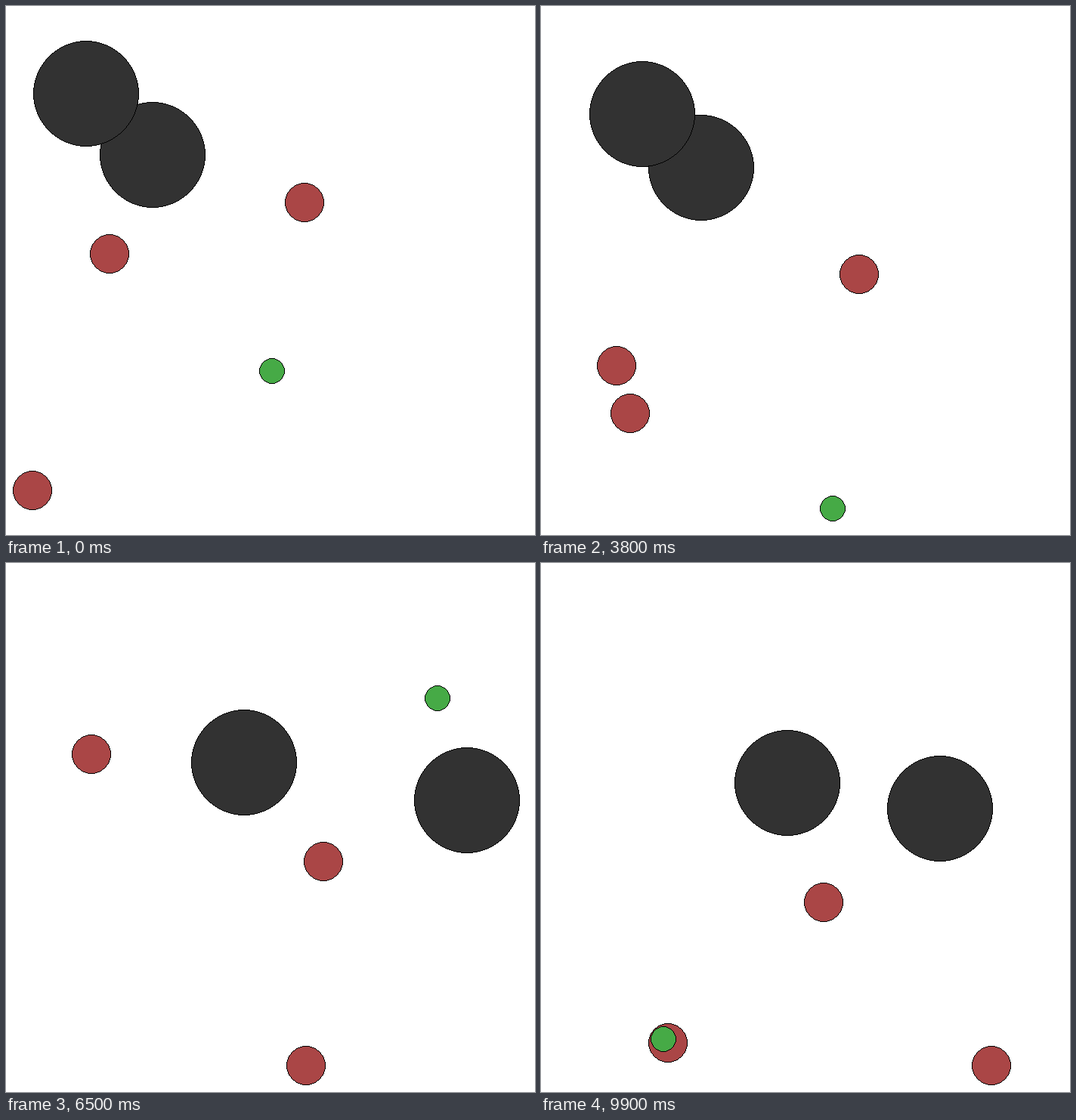
Recreate the animation shown at these times as an HTML page with a canvas. Size 700x700 px, loop 10000 ms.

```html
<!DOCTYPE html>
<html lang="en">
<head>
<meta charset="utf-8">
<title>Pursuit</title>
<style>
html, body { margin: 0; width: 100%; height: 100%; overflow: hidden; background: #fff; }
canvas { display: block; }
</style>
</head>
<body>
<canvas id="c" width="700" height="700"></canvas>
<script>
const ctx = document.getElementById('c').getContext('2d');
const STEP = 100, STEPS = 50, MID = 350, REACH = 315;

const CHASER = { r: 26, color: 'rgb(170,70,70)' };
const RUNNER = { r: 17, color: 'rgb(70,170,70)' };
const ROCK = { r: 70, color: 'rgb(50,50,50)' };

// Movers pass one point per beat; a rock has a single point.
const body = (kind, ...path) => ({ ...kind, path });

const rounds = [
  {
    beats: [0, 11, 23, 38, 45],
    bodies: [
      body(CHASER, [45.5, -89.5], [258, 70], [37.7, 256.1], [-261.7, 214.2], [-215, 273]),
      body(CHASER, [-212.5, -21.5], [-90, -50], [37.7, -65.1], [80.8, 6.2], [100, 25]),
      body(CHASER, [-315, 291.5], [-247, 195], [-308.5, 158.2], [-282.1, 143], [-272, 148]),
      body(RUNNER, [2.5, 133.5], [-60, 180], [-105.3, 226.7], [41.3, 356.1], [200, 210]),
      body(ROCK, [-155.9, -152.9]),
      body(ROCK, [-243.9, -233.02])
    ]
  },
  {
    beats: [4, 15, 27, 34, 49],
    bodies: [
      body(CHASER, [171.5, -35.5], [85.2, 55], [105, 60], [130.7, 53], [43.2, 175.6]),
      body(CHASER, [-35.5, 70.5], [-286, -116.7], [-466, -227], [-479.9, 22], [-320.3, 503.8]),
      body(CHASER, [93.5, 188.5], [57.4, 380.9], [150, 794], [210.9, 815], [435, 555.8]),
      body(RUNNER, [200.5, -233.5], [267.8, -206.2], [260, 20], [223.8, 262.6], [-330.8, 494.9]),
      body(ROCK, [-41.8, -103.9]),
      body(ROCK, [315, -42.6])
    ]
  }
];

// Smooth curve through the beats, straight on beyond the first and last.
function along(beats, vals, s) {
  const last = beats.length - 1;
  const slope = i => {
    const a = Math.max(i - 1, 0), b = Math.min(i + 1, last);
    return (vals[b] - vals[a]) / (beats[b] - beats[a]);
  };
  if (s <= beats[0]) return vals[0] + slope(0) * (s - beats[0]);
  if (s >= beats[last]) return vals[last] + slope(last) * (s - beats[last]);
  const j = beats.findIndex(b => b > s), i = j - 1;
  const span = beats[j] - beats[i], u = (s - beats[i]) / span, v = 1 - u;
  return vals[i] * v * v * (1 + 2 * u) + vals[j] * u * u * (3 - 2 * u)
    + span * u * v * (slope(i) * v - slope(j) * u);
}

function place(path, beats, s) {
  if (path.length === 1) return path[0];
  return [0, 1].map(axis => along(beats, path.map(p => p[axis]), s));
}

// One eighth of a circle by the midpoint method.
function arc(r) {
  const pts = [];
  let x = 0, y = r, f = 1 - r;
  while (x < y) {
    if (f >= 0) {
      y--;
      f -= 2 * y;
    }
    x++;
    f += 2 * x + 1;
    pts.push([x, y], [y, x]);
  }
  return pts;
}

// Hard-edged disc with a one-pixel black rim.
function disc(cx, cy, r, color) {
  const pts = arc(r);
  ctx.fillStyle = color;
  for (const [x, y] of pts) {
    for (const row of [cy - y, cy + y - 1]) ctx.fillRect(cx - x, row, 2 * x, 1);
  }
  ctx.fillStyle = '#000';
  for (const [x, y] of pts) {
    for (const row of [cy - y, cy + y - 1]) {
      for (const col of [cx - x, cx + x - 1]) ctx.fillRect(col, row, 1, 1);
    }
  }
}

function draw(tick) {
  const { beats, bodies } = rounds[Math.floor(tick / STEPS)];
  const spots = bodies.map(b => place(b.path, beats, tick % STEPS));
  // The camera zooms so that the farthest body sits at the margin.
  const range = Math.max(...spots.flat().map(Math.abs));
  const px = v => Math.floor(MID + REACH * (v / range));
  ctx.fillStyle = '#fff';
  ctx.fillRect(0, 0, 700, 700);
  bodies.forEach((b, i) => disc(px(spots[i][0]), px(spots[i][1]), b.r, b.color));
}

const start = performance.now();
function loop() {
  const t = Math.max(0, performance.now() - start);
  draw(Math.floor(t / STEP) % (STEPS * rounds.length));
  requestAnimationFrame(loop);
}
loop();
</script>
</body>
</html>
```
